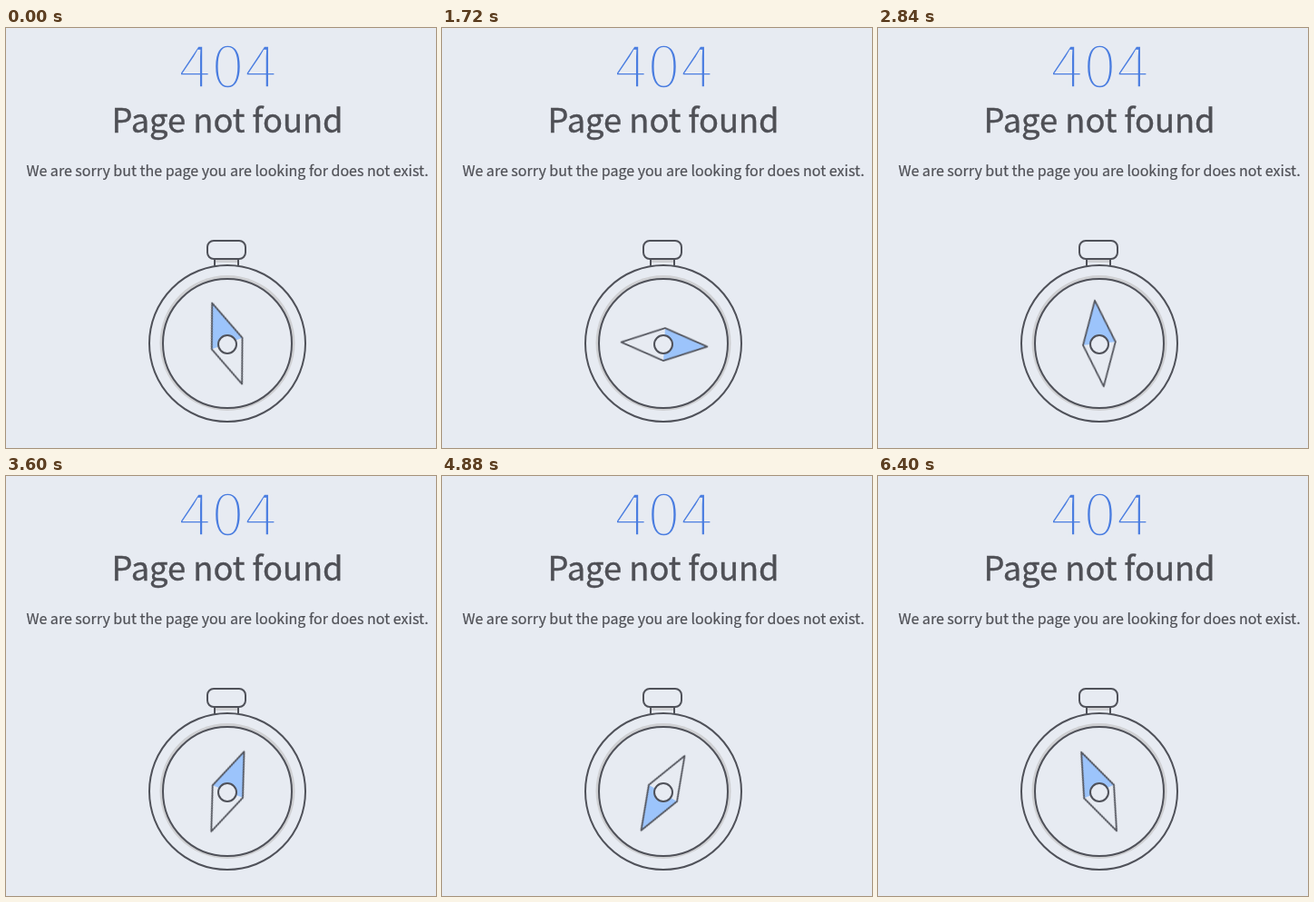
An HTML page for the animation above (6420 ms loop, 474x462 px).

```html
<!DOCTYPE html>
<html lang="en">
<head>
<meta charset="utf-8">
<title>Page not found</title>
<style>
  html, body { margin: 0; width: 100%; height: 100%; overflow: hidden; background: #e7ebf2; }
  svg { display: block; }
  text { font-family: "Noto Sans CJK SC", "Noto Sans CJK JP", "Noto Sans", sans-serif; text-anchor: middle; fill: #4f5056; }
  /* The outline in the background colour thins the digits. */
  .code { font-size: 65.5px; fill: #4a7de0; stroke: #e7ebf2; stroke-width: 3.4; }
  .title { font-size: 36.3px; stroke: #4f5056; stroke-width: .4; }
  .note { font-size: 16px; stroke: #4f5056; stroke-width: .2; }
  .line { fill: #e7ebf2; stroke: #4f5159; stroke-width: 2; stroke-linejoin: round; }
  .shade { fill: #cfd0d3; }
  .needle { animation: wander 6420ms infinite; }
  .needle .line { fill: none; stroke-width: 1.8; }

  /* Control points at 1/3 and 2/3 keep the speed continuous across the stops. */
  @keyframes wander {
    0%      { transform: rotate(-20.5deg); animation-timing-function: cubic-bezier(.333, .287, .667, .914); }
    14.642% { transform: rotate(198deg);   animation-timing-function: cubic-bezier(.333, -.149, .667, .504); }
    26.791% { transform: rotate(93.2deg);  animation-timing-function: cubic-bezier(.333, .753, .667, .925); }
    44.237% { transform: rotate(-5.9deg);  animation-timing-function: cubic-bezier(.333, -.18, .667, .102); }
    56.075% { transform: rotate(22.3deg);  animation-timing-function: cubic-bezier(.333, .227, .667, 1); }
    76.012% { transform: rotate(210.3deg); animation-timing-function: cubic-bezier(.333, 0, .667, 1.432); }
    99.688% { transform: rotate(-24.4deg); animation-timing-function: linear; }
    100%    { transform: rotate(-20.5deg); }
  }
</style>
</head>
<body>
<svg width="474" height="462" viewBox="0 0 474 462">
  <text class="code" x="244.5" y="65.5">404</text>
  <text class="title" x="244" y="115">Page not found</text>
  <text class="note" x="244" y="163">We are sorry but the page you are looking for does not exist.</text>

  <rect class="line" x="230" y="250" width="26" height="20"/>
  <rect class="shade" x="231" y="254" width="24" height="4"/>
  <rect class="line" x="222" y="234" width="42" height="20" rx="7"/>
  <circle class="line" cx="244" cy="347" r="86"/>
  <circle class="shade" cx="244" cy="346.5" r="74.5"/>
  <circle class="line" cx="244" cy="347" r="71"/>

  <g transform="translate(244 348)">
    <g class="needle">
      <path fill="#9cc4fb" d="M0-48.5 18-1H-18Z"/>
      <path class="line" d="M0-48.5 18-1 0 46.5-18-1Z"/>
    </g>
    <circle class="line" r="10"/>
  </g>
</svg>
</body>
</html>
```
